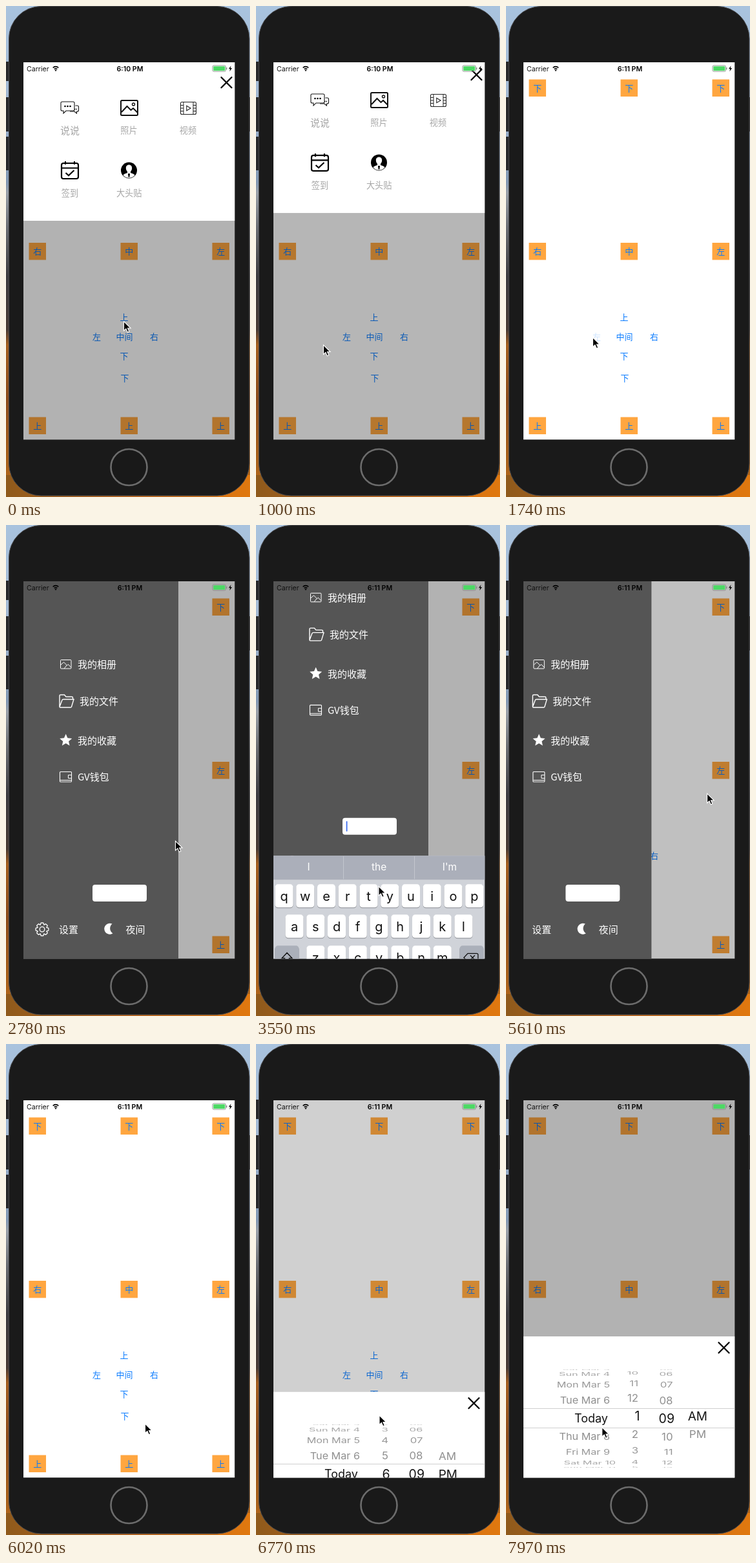
Animation, 378 px wide and 759 px high, one loop 8000 ms. Source, as an HTML page:

```html
<!DOCTYPE html>
<html lang="zh-CN">
<head>
<meta charset="utf-8">
<style>
html, body { margin: 0; width: 100%; height: 100%; overflow: hidden; background: #1a1a1a; }
svg { display: block; width: 100%; height: 100%; }
text { font-family: Inter, "Noto Sans CJK SC", "Noto Sans CJK", sans-serif; white-space: pre; }
.zh { font-family: "Noto Sans CJK SC", "Noto Sans CJK", sans-serif; font-weight: 350; }
</style>
</head>
<body>
<svg id="stage" viewBox="0 0 378 759" xmlns="http://www.w3.org/2000/svg"></svg>
<script>
const LOOP = 8000;
const stage = document.getElementById('stage');

// ---------- markup helpers ----------
const rect = (x, y, w, h, fill, r = 0, more = '') =>
  `<rect x="${x}" y="${y}" width="${w}" height="${h}" rx="${r}" fill="${fill}" ${more}/>`;
const line = (d, color, w, more = '') =>
  `<path d="${d}" fill="none" stroke="${color}" stroke-width="${w}" ${more}/>`;
const label = (s, x, y, size, fill, anchor = 'middle', more = '') =>
  `<text x="${x}" y="${y + size * .36}" font-size="${size}" fill="${fill}" text-anchor="${anchor}" ${more}>${s}</text>`;
const zh = (s, x, y, size, fill, anchor = 'middle', more = '') =>
  label(s, x, y, size, fill, anchor, 'class="zh" ' + more);
const cross = (x, y) => line(`M${x - 8} ${y - 8}l16 16m0-16l-16 16`, '#000', 2.3, 'stroke-linecap="round"');

// ---------- scene parts ----------
function backdrop() {
  const stops = [[0, '#a9c3de'], [.2, '#a2b8d2'], [.36, '#8298b3'], [.38, '#9aa0a8'], [.45, '#6d6f74'],
    [.55, '#3e3d40'], [.66, '#4a3d36'], [.69, '#a5601f'], [.8, '#8d4d1c'], [.92, '#a8611b'], [1, '#b86a1c']];
  return `<defs>
    <linearGradient id="land" x2="0" y2="1">${stops.map(([o, c]) => `<stop offset="${o}" stop-color="${c}"/>`).join('')}</linearGradient>
    <linearGradient id="ground"><stop stop-color="#8f5a1c"/><stop offset=".5" stop-color="#c4681a"/><stop offset="1" stop-color="#e0780f"/></linearGradient>
    <clipPath id="screen">${rect(27, 87, 327.5, 583.5, '#fff')}</clipPath></defs>` +
    rect(0, 0, 378, 759, 'url(#land)') + rect(0, 725, 378, 34, 'url(#ground)');
}

function phone() {
  const side = [[86, 30], [141, 53], [202, 52]].map(([y, h]) => rect(-3, y, 9, h, '#29292b', 1)).join('');
  return side + rect(375, 141, 6, 53, '#29292b', 1) +
    rect(4.5, .5, 372.5, 756.5, '#1a1a1a', 50, 'stroke="#4a4a4c"') +
    '<circle cx="190.5" cy="713" r="28" fill="#191919" stroke="#6c6c6c" stroke-width="2.6"/>';
}

function home() {
  const blue = '#087aff';
  const grid = [['下下下', 113.5], ['右中左', 366], ['上上上', 635.5]].map(([row, y]) =>
    [...row].map((c, i) => rect(35.5 + 142 * i, y, 26.5, 26.5, '#ffa640') +
      zh(c, 48.7 + 142 * i, y + 13.4, 13, blue)).join('')).join('');
  const links = [['上', 183, 481], ['左', 140.5, 511, 'linkLeft'], ['中间', 183.5, 511], ['右', 229.5, 511],
    ['下', 183, 541], ['下', 184, 575, 'linkDown']];
  return rect(27, 87, 327.5, 583.5, '#fff') + grid +
    links.map(([s, x, y, id]) => zh(s, x, y, 13, blue, 'middle', id ? `id="${id}"` : '')).join('');
}

function topPanel() {
  const k = '#111', grey = '#a6a6a6';
  const chat = line('M87 148h17q2 0 2 2v10q0 2-2 2h-11l-4 4v-4h-2q-2 0-2-2v-10q0-2 2-2z', k, 1.1) +
    line('M107.5 154h3q2 0 2 2v5q0 2-2 2h-1v3l-3.500-3h-7', k, 1.1) +
    [91.5, 95.5, 99.5].map(x => `<circle cx="${x}" cy="155" r="1.3"/>`).join('') +
    line('M106 159.500h4', k, 1.6, 'stroke-dasharray="1.5 1"');
  const photo = rect(178, 146, 26, 23, 'none', 1.5, 'stroke="#111" stroke-width="2"') +
    line('M179 164l8.500-9 6 6 3.500-3 7 7', k, 2) +
    '<circle cx="197.500" cy="152" r="2" fill="none" stroke="#111" stroke-width="1.4"/>';
  const film = rect(270.5, 148.5, 24, 19, 'none', 2, 'stroke="#222" stroke-width="1.1"') +
    line('M275 148.500v19M290 148.500v19M270.500 153.500h4.500m-4.500 4.500h4.500m-4.500 4.500h4.500M290 153.500h4.500m-4.500 4.500h4.500m-4.500 4.500h4.500', '#222', 1) +
    line('M279.800 154.300v7.400l6.300-3.700z', '#222', 1.1);
  const calendar = rect(86, 243, 26, 24, 'none', 3, 'stroke="#000" stroke-width="2.2"') +
    line('M86 250.500h26M92 240v5M106 240v5', '#000', 2.2) + line('M92.500 258l4.500 4 8.500-8', '#000', 2.2);
  const face = '<circle cx="190.500" cy="254" r="12.500"/>' +
    '<path d="M190.500 245.500c6 0 5.500 8 2.500 10.500v2c3 1 6 2 6.500 3.500a11.500 11.500 0 0 1-18 0c.500-1.500 3.500-2.500 6.500-3.500v-2c-3-2.500-3.500-10.500 2.500-10.500z" fill="#fff"/>' +
    '<path d="M189 259h3l-.600 5.500h-1.800z"/>';
  return rect(27, 87, 327.5, 245, '#fff') + cross(341.5, 118.3) + chat + photo + film + calendar + face +
    zh('说说', 99, 192.5, 15, grey) + zh('照片', 190.5, 192.5, 13.2, grey) + zh('视频', 282, 192.5, 13.2, grey) +
    zh('签到', 99, 289, 13.2, grey) + zh('大头贴', 190.7, 289, 13.2, grey);
}

// closed outline from a radius rule
const polar = (cx, cy, n, radius) => 'M' + Array.from({ length: n }, (_, i) => {
  const a = i / n * 2 * Math.PI - Math.PI / 2, r = radius(i);
  return `${(cx + r * Math.cos(a)).toFixed(2)} ${(cy + r * Math.sin(a)).toFixed(2)}`;
}).join('L') + 'Z';

function sidebar() {
  const w = '#fff';
  const star = `<path d="${polar(92.7, 333, 10, i => i % 2 ? 4.6 : 10)}" fill="#fff"/>`;
  const gear = line(polar(56, 625, 32, i => (i + 1) % 4 < 3 && i % 4 < 2 || i % 4 === 3 ? 10 : 7.4), w, 1.3, 'stroke-linejoin="round"') +
    '<circle cx="56" cy="625" r="3.800" fill="none" stroke="#fff" stroke-width="1.300"/>';
  const album = rect(84.5, 208.5, 16.5, 13.5, 'none', 1, 'stroke="#fff"') +
    line('M85 216l4.500-4 5 5 2-1.500 4 4.500M90 222l4-5', w, 1);
  const folder = line('M83 281v-17q0-1.500 1.500-1.500h6l2.500 3h9q1.500 0 1.500 1.500v2.500M83 281l4-10.500q.300-1 1.500-1h16.500l-3.500 11.500q-.300 1-1.500 1h-16q-1 0-1-1z', w, 1.4);
  const wallet = rect(83.5, 381.5, 18, 15.5, 'none', 1, 'stroke="#fff" stroke-width="1.1"') +
    line('M101.500 386.500h-5v5h5M84 394.500h17', w, 1);
  const moon = '<path d="M164.500 616.600a8.500 8.500 0 1 0 1 14.700a9 9 0 0 1-1-14.700z" fill="#fff"/>';
  return rect(27, 87, 240, 730, '#555') + '<g id="menu">' + album + folder + star + wallet + gear + moon +
    zh('我的相册', 111, 215.5, 15, w, 'start') + zh('我的文件', 114, 272.5, 15, w, 'start') +
    zh('我的收藏', 111, 333.5, 15, w, 'start') +
    `<text x="111" y="394.900" font-size="15" fill="#fff" class="zh">GV钱包</text>` +
    rect(134, 556, 84, 26, w, 4) + rect(139.7, 561, 1.8, 16, '#3d6df0', .8, 'id="caret"') +
    zh('设置', 82, 625.5, 15, w, 'start') + zh('夜间', 185.5, 625.5, 15, w, 'start') + '</g>';
}

function keyboard() {
  const top = 445, pitch = 32.75;
  const key = (x, y, w, fill = '#fff') => rect(x, y + 1, w, 36, '#888b91', 4.5) + rect(x, y, w, 36, fill, 4.5);
  const row = (s, x, y) => [...s].map((c, i) => key(x + i * pitch, y, 28) +
    label(c, x + 14 + i * pitch, y + 18.5, 20, '#111')).join('');
  const y3 = top + 139, y4 = top + 185, dark = '#abb0ba';
  const words = [['I', 81.5], ['the', 190.7], ["I'm", 300]].map(([s, x]) => label(s, x, top + 17.5, 15.5, '#fff')).join('');
  return rect(27, top, 327.5, 230, '#d0d3d9') + rect(27, top, 327.5, 37, '#abafba') +
    line(`M135.500 ${top + 1}v35M245.500 ${top + 1}v35`, '#c3c6ce', 1) + words +
    row('qwertyuiop', 29.5, top + 44) + row('asdfghjkl', 45.5, top + 91) +
    key(29.5, y3, 37, dark) + key(315.5, y3, 37, dark) + row('zxcvbnm', 78.3, y3) +
    line(`M48 ${y3 + 11}l8 8.500h-4.500v6.500h-7v-6.500h-4.500z`, '#111', 1.4) +
    line(`M328 ${y3 + 12}h14q2 0 2 2v9q0 2-2 2h-14l-6-6.500zM332 ${y3 + 15}l7 7m0-7l-7 7`, '#111', 1.3) +
    key(29.5, y4, 36, dark) + label('123', 47.5, y4 + 18, 14, '#111') + key(71, y4, 36, dark) +
    `<circle cx="89" cy="${y4 + 18}" r="8" fill="none" stroke="#111" stroke-width="1.300"/>` +
    key(112.5, y4, 151) + label('space', 188, y4 + 18, 14, '#111') +
    key(269, y4, 83.5, dark) + label('return', 311, y4 + 18, 14, '#111');
}

function picker() {
  return rect(27, 452, 327.5, 219, '#fff') + cross(337.5, 469.5) + '<g id="wheels"></g>' +
    line('M27 563.500h327.500M27 593.500h327.500', '#cfcfcf', 1);
}

function statusBar() {
  const arcs = [[3.1, 1.7], [6, 1.7]].map(([r, w]) =>
    line(`M${77 - r * .72} ${100 - r * .75}A${r} ${r} 0 0 1 ${77 + r * .72} ${100 - r * .75}`, '#000', w)).join('');
  return label('Carrier', 32, 96.7, 10.6, '#111', 'start') + arcs + '<path d="M75.400 99.200l1.600 1.900 1.600-1.900q-1.600-1.300-3.200 0z"/>' +
    label('', 192, 96.7, 10.6, '#000', 'middle', 'id="clock" font-weight="600"') +
    rect(320, 92, 20.5, 9.2, 'none', 2, 'stroke="#8a8f8b" stroke-width=".9"') + rect(321.3, 93.3, 18, 6.6, '#4cd964', 1) +
    rect(341.2, 95, 1.3, 3.4, '#8a8f8b', .6) + '<path d="M348.500 92.300l-3.500 5h2.200l-.800 4 3.700-5.200h-2.300z"/>';
}

const pointer = `<path d="M0 0V14.500L3.400 11.400L5.800 16.800L8.300 15.700L6 10.500H10.600Z" fill="#000" stroke="#fff" stroke-width="1.100"/>`;

stage.innerHTML = backdrop() + phone() + '<g clip-path="url(#screen)">' + home() +
  rect(27, 87, 327.5, 583.5, '#000', 0, 'id="shade"') +
  `<g id="side">${sidebar()}</g><g id="top">${topPanel()}</g><g id="sheet">${picker()}</g><g id="keys">${keyboard()}</g>` +
  statusBar() + `</g><g id="mouse">${pointer}</g>`;

const el = {};
stage.querySelectorAll('[id]').forEach(n => el[n.id] = n);

// ---------- picker wheels ----------
const STEP = 21.6 * Math.PI / 180, RADIUS = 76, MID = 579;
const DAYS = ['Sun', 'Mon', 'Tue', 'Wed', 'Thu', 'Fri', 'Sat'];
const pad = n => String(n).padStart(2, '0');
const columns = [
  { x: 161, big: 18, small: 16.2, midX: 158, text: n => n ? `${DAYS[(n + 10) % 7]} Mar ${7 + n}` : 'Today', shift: n => n > 2 ? 9 : 0 },
  { x: 205, big: 19.5, small: 16.8, midX: 207.5, text: n => (n + 23) % 12 + 1 },
  { x: 258.5, big: 19.5, small: 16.8, midX: 261, text: n => pad(n) },
  { x: 310, big: 19, small: 17, midX: 312, text: n => ['AM', 'PM'][n] || '' }
];
for (const c of columns) {
  c.rows = Array.from({ length: 9 }, () => {
    const t = document.createElementNS('http://www.w3.org/2000/svg', 'text');
    t.setAttribute('text-anchor', 'end');
    el.wheels.append(t);
    return t;
  });
}

function turn(c, v) {
  const base = Math.round(v);
  c.rows.forEach((node, i) => {
    const n = base + i - 4, a = (n - v) * STEP;
    const seen = Math.abs(a) < 1.54;
    node.setAttribute('display', seen ? 'inline' : 'none');
    if (!seen) return;
    const mid = Math.abs(n - v) <= .5, size = mid ? c.big : c.small;
    const x = mid ? c.midX : c.x + (c.shift ? c.shift(n) : 0);
    node.textContent = c.text(n);
    node.setAttribute('font-size', size);
    node.setAttribute('y', size * .36);
    const g = mid ? 20 : Math.round(140 + 45 * (1 - Math.cos(a)));
    node.setAttribute('fill', `rgb(${g},${g},${g})`);
    node.setAttribute('transform', `translate(${x} ${MID + RADIUS * Math.sin(a)}) scale(1 ${Math.cos(a)})`);
  });
}

// ---------- motion ----------
const part = (t, a, b) => Math.min(1, Math.max(0, (t - a) / (b - a)));
const ease = u => (1 - Math.cos(Math.PI * u)) / 2;
const tween = (t, a, b) => ease(part(t, a, b));
const spring = ms => { const x = Math.max(0, ms) * .0193; return 1 - (1 + x) * Math.exp(-x); };

// start, end, x, y
const moves = [
  [30, 580, 104.5, 524], [1200, 1690, 134.5, 512.5], [1960, 2480, 262.5, 488.5], [2780, 3320, 190, 558.5],
  [3600, 4130, 312.8, 413], [5580, 6010, 215.5, 587], [6040, 6250, 191, 574],
  [7180, 7420, 190, 608], [7500, 7960, 148.8, 592.5]
];
function mouseAt(t) {
  let x = 182.5, y = 487.5;
  for (const [a, b, tx, ty] of moves) {
    const p = tween(t, a, b);
    x += (tx - x) * p;
    y += (ty - y) * p;
  }
  return [x, y];
}

const shift = (node, x, y) => node.setAttribute('transform', `translate(${x} ${y})`);
const press = (t, a, b) => t < a ? 1 : t < b ? .2 : .2 + .8 * part(t, b, b + 200);

function draw(t) {
  const top = 1 - tween(t, 930, 1430);
  const side = tween(t, 1790, 2270) - tween(t, 5480, 5960);
  const sheet = tween(t, 6480, 6990);
  const keys = spring(t - 3423) - spring(t - 4327);

  shift(el.top, 0, -246 * (1 - top));
  shift(el.side, -241 * (1 - side), 0);
  shift(el.menu, 0, -146 * keys);
  shift(el.sheet, 0, 220 * (1 - sheet));
  shift(el.keys, 0, 226 * (1 - keys));
  el.keys.setAttribute('display', keys > .002 ? 'inline' : 'none');
  el.shade.setAttribute('opacity', .3 * Math.min(1, top + side + sheet));
  el.caret.setAttribute('opacity', t > 3423 && t < 4327 ? 1 : 0);
  el.linkLeft.setAttribute('opacity', press(t, 1710, 1800));
  el.linkDown.setAttribute('opacity', press(t, 6470, 6530));
  el.clock.textContent = t < 1200 ? '6:10 PM' : '6:11 PM';

  turn(columns[0], 0);
  turn(columns[1], 18 - 16.87 * tween(t, 7180, 7965));
  turn(columns[2], 9);
  turn(columns[3], 1 - .86 * tween(t, 7520, 7965));
  shift(el.mouse, ...mouseAt(t));
}

function tick() {
  draw(performance.now() % LOOP);
  requestAnimationFrame(tick);
}
tick();
</script>
</body>
</html>
```
